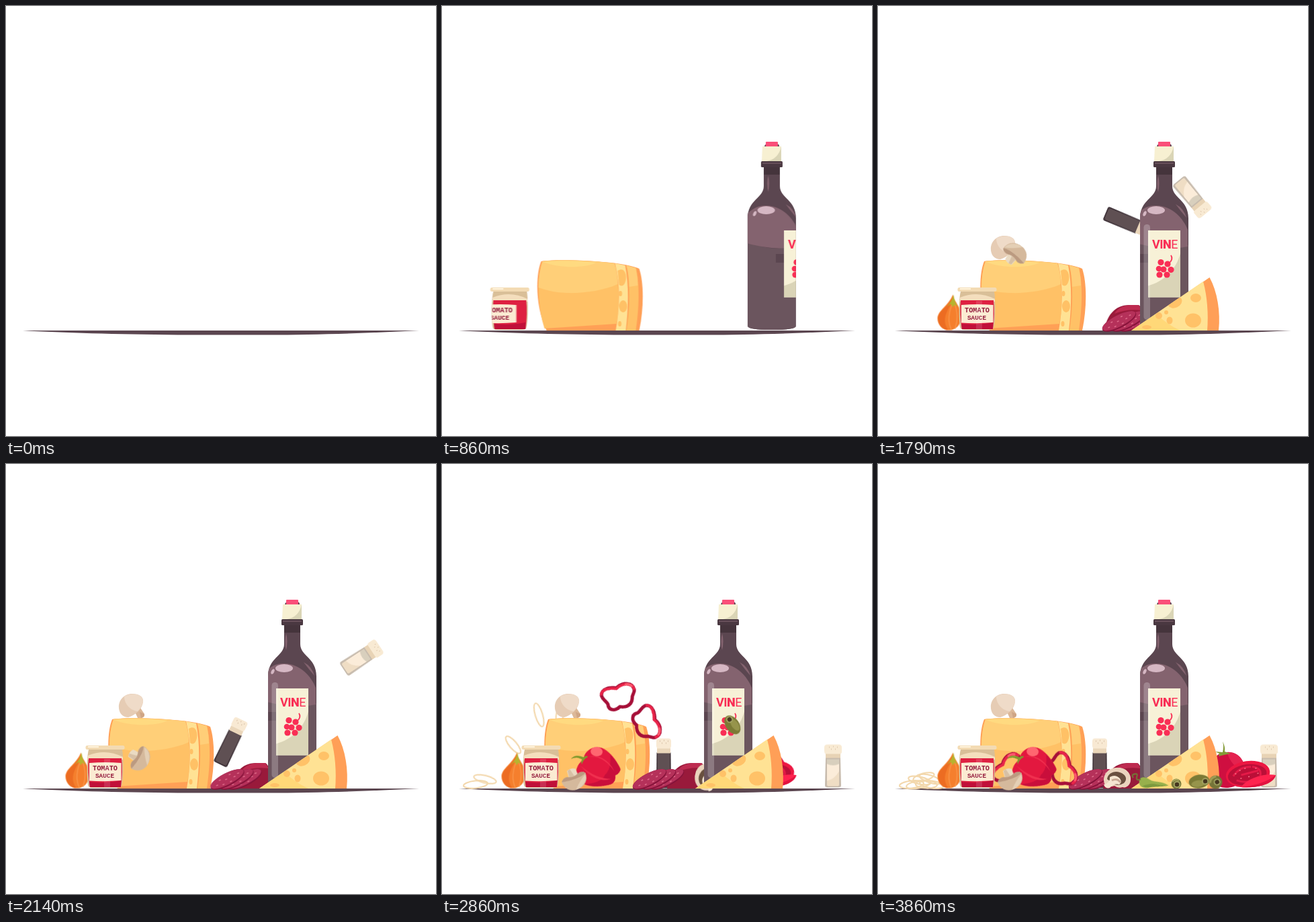
These frames come from a looping animation (640x640 px, 6000 ms). An HTML page:

```html
<!DOCTYPE html>
<html lang="en">
<head>
<meta charset="utf-8">
<title>Pizza ingredients</title>
<style>
:root { --t: 0ms }
html, body { margin: 0; width: 100%; height: 100%; overflow: hidden; background: #fff }
svg { display: block; width: 100vw; height: 100vh }
text { font-family: "Liberation Mono", monospace; font-weight: 700; text-anchor: middle }

/* Animations stay paused; the clock moves them by shifting their delay.
   Each part is hidden until its own start. */
.slide { animation: slide var(--d, 1298ms) var(--ease, cubic-bezier(.333,.667,.667,1)) both paused, show 1ms step-end both paused;
  animation-delay: calc(var(--s, 140ms) - var(--t)) }
.toss { animation: var(--path) 6s linear both paused, show 1ms step-end both paused;
  animation-delay: calc(0ms - var(--t)), calc(var(--s) - var(--t)) }
.ring { animation: ring 500ms linear both paused, show 1ms step-end both paused;
  animation-delay: calc(var(--s) - var(--t));
  fill: none; stroke: #f3d8ad; stroke-width: 2.2 }

@keyframes show { from { visibility: hidden } to { visibility: visible } }
@keyframes slide { from { transform: translateX(var(--from)) } to { transform: none } }
@keyframes ring {
  0% { transform: translate(185px,405px) rotate(0deg) }
  28% { transform: translate(164px,357px) rotate(-10deg) }
  57% { transform: translate(122px,392px) rotate(-24deg) }
  85% { transform: translate(88px,447px) rotate(-58deg) }
  100% { transform: translate(var(--x),var(--y)) rotate(var(--r)) }
}
@keyframes onion {
  0%, 17% { transform: translate(-30px,430px) rotate(-330deg) }
  18.6% { transform: translate(8px,355px) rotate(-255deg) }
  20.17% { transform: translate(36px,340px) rotate(-196deg) }
  22.6% { transform: translate(72px,366px) rotate(-100deg) }
  25.5%, 100% { transform: translate(106.5px,456.5px) }
}
@keyframes mushroom {
  0%, 14.8% { transform: translate(210px,425px) rotate(200deg) }
  17.5% { transform: translate(197px,315px) rotate(125deg) }
  20.17% { transform: translate(191px,276px) rotate(70deg) }
  22.6% { transform: translate(188px,296px) rotate(35deg) }
  26%, 100% { transform: translate(185px,359px) }
}
@keyframes half {
  0%, 18.6% { transform: translate(203px,475px) rotate(-10deg); opacity: 0 }
  20.17% { transform: translate(203px,454px); opacity: .8 }
  22% { opacity: 1 }
  25% { transform: translate(205px,362px) rotate(18deg) }
  29.83% { transform: translate(204px,369px) rotate(38deg) }
  34% { transform: translate(200px,415px) rotate(90deg) }
  38%, 100% { transform: translate(197px,470px) rotate(160deg); opacity: 1 }
}
@keyframes pepperpot {
  0%, 17% { transform: translate(426px,400px) rotate(180deg) }
  20.17% { transform: translate(455px,320px) rotate(212deg) }
  25% { transform: translate(424px,300px) rotate(165deg) }
  29.83% { transform: translate(372px,323px) rotate(112deg) }
  34% { transform: translate(338px,390px) rotate(45deg) }
  38%, 100% { transform: translate(330px,445.5px) }
}
@keyframes salt {
  0%, 24% { transform: translate(426px,400px) rotate(180deg) }
  29.83% { transform: translate(468px,283px) rotate(140deg) }
  34.5% { transform: translate(515px,262px) rotate(75deg) }
  38% { transform: translate(556px,338px) rotate(22deg) }
  41.67% { transform: translate(581px,438.5px) rotate(-8deg) }
  44%, 100% { transform: translate(582px,449.5px) }
}
@keyframes salami {
  0%, 25% { transform: translateX(112px) }
  29.83% { transform: translateX(49px); animation-timing-function: ease-out }
  41.67% { transform: translateX(7px) }
  47%, 100% { transform: none }
}
@keyframes slice {
  0%, 39% { transform: translate(440px,458px) rotate(-240deg) }
  41.67% { transform: translate(444px,466px) rotate(-200deg) }
  47% { transform: translate(398px,465px) rotate(-90deg) }
  51%, 100% { transform: translate(356px,467px) }
}
@keyframes pepper {
  0%, 36% { transform: translate(426px,400px) rotate(60deg) }
  39% { transform: translate(362px,352px) rotate(28deg) }
  41.67% { transform: translate(311px,377px) }
  44% { transform: translate(266px,420px) rotate(-30deg) }
  46.5%, 100% { transform: translate(232px,455px) rotate(-55deg) }
}
@keyframes loopA {
  0%, 38% { transform: translate(426px,390px) rotate(60deg) }
  41.67% { transform: translate(351px,342px) }
  47% { transform: translate(270px,340px) rotate(-15deg) }
  53.5% { transform: translate(202px,412px) rotate(-42deg) }
  57%, 100% { transform: translate(196px,456px) rotate(-50deg) }
}
@keyframes loopB {
  0%, 39% { transform: translate(426px,390px) rotate(120deg) }
  41.67% { transform: translate(399px,350px) rotate(90deg) }
  44.5% { transform: translate(350px,335px) rotate(75deg) }
  48% { transform: translate(298px,392px) rotate(65deg) }
  51%, 100% { transform: translate(273px,456px) rotate(60deg) }
}
@keyframes oliveA {
  0%, 39.5% { transform: translate(396px,470px) scale(0) }
  41.67% { transform: translate(400px,452px) rotate(8deg) }
  47% { transform: translate(428px,390px) rotate(50deg) }
  50.5% { transform: translate(452px,380px) rotate(80deg) }
  53.5% { transform: translate(471px,406px) rotate(105deg) }
  57%, 100% { transform: translate(478px,472.5px) rotate(172deg) }
}
@keyframes oliveB {
  0%, 49.5% { transform: translate(384px,425px) rotate(-90deg) scale(0) }
  53.5% { transform: translate(390px,367px) }
  56% { transform: translate(406px,362px) rotate(45deg) }
  59% { transform: translate(428px,412px) rotate(200deg) }
  62%, 100% { transform: translate(444px,476px) rotate(360deg) }
}
@keyframes oliveC {
  0%, 49.5% { transform: translate(458px,410px) rotate(-120deg) scale(0) }
  53.5% { transform: translate(480px,371px) }
  56% { transform: translate(490px,395px) rotate(100deg) }
  59.5%, 100% { transform: translate(502.5px,473.5px) rotate(330deg) }
}
@keyframes chili {
  0%, 49.5% { transform: translate(465px,410px) rotate(90deg) scale(0) }
  53.5% { transform: translate(516px,366px) rotate(18deg) }
  57% { transform: translate(480px,366px) rotate(5deg) }
  60.5% { transform: translate(438px,415px) rotate(-8deg) }
  63.8%, 100% { transform: translate(405px,471px) rotate(-14deg) }
}
</style>
</head>
<body>
<svg viewBox="0 0 640 640">
<defs>
  <clipPath id="jarClip"><path d="M123 425H173C175 437 175 470 172 479Q171 482 166 482H128Q123 482 122 478C120 465 120 437 123 425Z"/></clipPath>
  <clipPath id="bottleClip"><path id="glass" d="M414 239H438V268C438 286 462 288 462 316V476Q462 482 426 482Q390 482 390 476V316C390 288 414 286 414 268Z"/></clipPath>
  <clipPath id="wedgeClip"><path id="wedgeFace" d="M377 483L484 410C490 432 492 458 490 483Z"/></clipPath>
  <clipPath id="labelClip"><path d="M402 334H450V433.500H402Z"/></clipPath>
  <g id="loop" fill="none" stroke-linejoin="round">
    <path d="M-24 -11C-21 -20 -8 -18 0 -14C12 -20 25 -15 25 -4C24 2 19 2 18 8C14 18 3 18 -3 14C-12 19 -21 14 -19 6C-19 0 -26 -4 -24 -11Z" stroke="#a60f38" stroke-width="5"/>
    <path d="M-24 -12C-20 -19 -8 -17 0 -13C12 -19 25 -14 25 -5" stroke="#e92449" stroke-width="4" stroke-linecap="round"/>
    <path d="M15 -15Q20 -15 23 -10" stroke="#ff5c70" stroke-width="3" stroke-linecap="round"/>
  </g>
  <g id="hole"><circle r="5" fill="#a9ab68"/><circle r="3.300" fill="#46371f"/></g>
</defs>

<path d="M25 483H615C540 487 460 489.500 390 489.500H260C165 488.500 85 486.500 25 483Z" fill="#5b4650"/>

<g id="rings"></g>

<g class="toss" style="--path:mushroom;--s:880ms">
  <path d="M6 8L15 4L21 13Q22 18 16 19L11 19Z" fill="#dcb898"/>
  <path d="M14 10L21 13Q22 18 16 19Z" fill="#cfa585"/>
  <path d="M-13 14C-22 4 -16 -17 3 -17C14 -17 20 -12 19 -5C18 5 8 15 -3 18Q-9 18 -13 14Z" fill="#e6ccb4"/>
  <path d="M-9 -13C0 -19 20 -18 19 -5C18 0 15 5 11 9C0 8 -9 -2 -9 -13Z" fill="#efdbc8"/>
</g>

<g class="toss" style="--path:salt;--s:1440ms">
  <path d="M-11 -12H11L12 29Q12 32 8 32H-8Q-12 32 -12 29Z" fill="#c8bcae"/>
  <path d="M-9 -10H9V27Q9 30 6 30H-6Q-9 30 -9 27Z" fill="#fbecd9"/>
  <path d="M-9 -10H9V-3Q0 1 -9 -3Z" fill="#d8cfbd"/>
  <path d="M-9 22Q2 20 9 8V27Q9 30 6 30H-6Q-9 30 -9 27Z" fill="#efddc4"/>
  <path d="M-13 -28Q-13 -32 -8 -32H8Q13 -32 13 -28V-20Q12 -18 11 -18V-12H-11V-18Q-13 -19 -13 -22Z" fill="#f8ead3"/>
  <path d="M-11 -18H11V-12H-11Z" fill="#e8d3b5"/>
  <path d="M-6 -28h1M0 -29h1M6 -28h1M-3 -25h1M3 -25h1" stroke="#c9a98b"/>
</g>

<g class="slide" style="--s:2710ms;--d:685ms;--from:-56px">
  <path d="M514 430C530 425 546 437 546 455C546 473 534 482 518 482C504 482 497 471 497 456C497 442 502 431 514 430Z" fill="#cf0f40"/>
  <path d="M520 430C533 427 546 439 545 455C536 456 524 445 520 430Z" fill="#e4224f"/>
  <path d="M513 413Q517 421 516 428L525 431L515 433L507 435L508 431L502 428L513 429Q515 420 513 413Z" fill="#839a37"/>
</g>
<g class="slide" style="--s:2710ms;--d:685ms;--from:-96px">
  <g transform="translate(550.500 461.500) rotate(-8)">
    <ellipse rx="33" ry="19.500" fill="#ec1742"/><ellipse cx="-1" cy="1" rx="29" ry="15.500" fill="#bb0f38"/>
    <path d="M-22 0Q-10 -13 6 -10M-18 7Q-2 15 12 9M-10 0L16 -3M8 -10Q22 -6 18 5" fill="none" stroke="#e51a48" stroke-width="3"/>
    <path d="M-19 -3h2M-12 -7h2M-4 -9h2M-12 5h2M0 4h2M14 1h2M12 -7h2" stroke="#f8758b" stroke-width="1.500"/>
  </g>
</g>
<g class="slide" style="--s:2710ms;--d:650ms;--from:-108px">
  <path d="M540 481C551 467 575 460 592 463C589 475 567 483 540 481Z" fill="#ff234f"/>
  <path d="M540 481C560 479 580 473 592 463C589 476 567 483 540 481Z" fill="#e31340"/>
</g>

<g class="slide" style="--d:1010ms;--from:-312px;--ease:cubic-bezier(.215,.61,.355,1)">
  <path d="M158 380C175 377 225 378 262 382C280 384 295 387 304 391C311 412 311 450 304 483H166C150 450 149 402 158 380Z" fill="#ffa056"/>
  <path d="M160 380C185 377 235 379 267 383C275 415 275 450 270 473L163 480C153 450 151 405 160 380Z" fill="#ffc166"/>
  <path d="M160 380C185 377 235 379 267 383Q272 398 272 414C250 424 220 428 195 427Q172 426 154 419Q154 397 160 380Z" fill="#ffcf78"/>
  <path d="M161 381C185 378 215 379 240 382C225 390 185 391 161 381Z" fill="#ffda80"/>
  <path d="M268 383L283 386C289 415 288 450 284 483H269C275 450 276 415 268 383Z" fill="#ffe294"/>
  <path d="M285 386L299 390C305 415 304 450 299 483H285C290 450 291 415 285 386Z" fill="#ffc166"/>
  <path d="M285 386L299 390Q302 403 302 416L289 418Q289 401 285 386Z" fill="#ffce78"/>
  <g fill="#ffc166"><path d="M272 394C281 388 286 398 284 408C281 420 276 416 274 415Z"/><ellipse cx="280" cy="447" rx="6" ry="9"/><ellipse cx="276" cy="428" rx="2.500" ry="4"/><ellipse cx="275" cy="473" rx="2.500" ry="4"/></g>
</g>

<g class="toss" style="--path:onion;--s:1000ms">
  <path d="M5 -27C6 -17 17 -10 17 5C18 18 9 26 -1 26C-11 26 -18 18 -18 8C-17 -4 -2 -10 5 -27Z" fill="#f57f2d"/>
  <path d="M4 -22C-2 -8 -17 -3 -17 9C-17 20 -8 26 -2 26C-13 10 -3 -4 5 -18Z" fill="#ec6c22"/>
  <path d="M6 -18Q-6 8 3 26M7 -15Q15 5 8 24" fill="none" stroke="#fa9549" stroke-width="1.500"/>
  <path d="M6 -27Q7 -17 12 -9L7 -12L5 -8L2 -13L-4 -9Q4 -17 6 -27Z" fill="#b6b42f"/>
</g>

<g class="toss" style="--path:loopA;--s:2270ms"><use href="#loop"/></g>

<g class="slide" style="--from:-233px">
  <g clip-path="url(#jarClip)">
    <path d="M118 424H178V484H118Z" fill="#d9bf98"/>
    <path d="M122 434Q148 423 174 436V440H122Z" fill="#f4debd"/>
    <path d="M123 438H172Q174 458 171 481H125Q121 458 123 438Z" fill="#de2041"/>
    <path d="M124 473Q148 476 171 471V481H125Z" fill="#c01039"/>
    <g class="slide" style="--from:-72px">
      <path d="M124 445Q148 443 171.500 445V471Q148 473 124 471.500Z" fill="#fbebd2"/>
      <g fill="#931a3b"><text x="147.500" y="456" font-size="10.300">TOMATO</text><text x="147" y="466.500" font-size="9.400">SAUCE</text></g>
    </g>
    <rect class="slide" style="--from:-160px" x="146" y="439" width="9" height="42" fill="#fff" opacity=".13"/>
  </g>
  <rect x="118.500" y="419" width="58" height="6" rx="2.500" fill="#f3dbb4"/>
  <path d="M122 421H138" stroke="#fff5df" stroke-width="2"/>
</g>

<g class="toss" style="--path:pepperpot;--s:1020ms">
  <path d="M-10.500 -16H10.500L11 34Q11 37 8 37H-8Q-11 37 -11 34Z" fill="#43363c"/>
  <path d="M-9 -15H9V32Q9 35 6 35H-6Q-9 35 -9 32Z" fill="#5f5053"/>
  <path d="M-11 -33Q-11 -37 -7 -37H7Q11 -37 11 -33V-25L10 -23V-15H-10V-23L-11 -25Z" fill="#f8e9d3"/>
  <path d="M-10 -22H10V-15H-10Z" fill="#ead6ba"/>
  <path d="M-6 -33h1M0 -34h1M6 -33h1M-3 -30h1M3 -30h1" stroke="#b99a7f"/>
</g>

<g class="slide" style="--s:1430ms;--d:430ms;--from:60px">
  <path d="M335 483C338 462 350 445 372 445H386Q394 448 393 483Z" fill="#991a3b"/>
  <path d="M350 458Q357 446 374 445H386L391 453Q370 450 350 458Z" fill="#bd2b50"/>
</g>
<g class="toss" style="--path:salami;--s:1490ms">
  <g id="salami"></g>
</g>

<g class="toss" style="--path:loopB;--s:2330ms"><use href="#loop"/></g>
<g class="toss" style="--path:pepper;--s:2150ms">
  <path d="M0 -26C8 -32 25 -29 30 -14C33 0 26 18 20 27Q14 30 8 26Q0 33 -7 28C-17 20 -32 0 -30 -12C-27 -27 -10 -31 0 -26Z" fill="#e3183f"/>
  <path d="M-29 -4C-18 10 -8 15 0 13Q13 16 29 2Q26 18 20 27Q14 30 8 26Q0 33 -7 28C-17 20 -28 6 -29 -4Z" fill="#c90e3b"/>
  <path d="M-10 -25Q-13 5 0 24Q-19 10 -10 -25ZM6 -24Q23 -8 12 22Q27 -6 6 -24Z" fill="#f0304f"/>
  <ellipse cx="21" cy="-17" rx="7" ry="9" fill="#ff6670" transform="rotate(-30 21 -17)"/>
  <path d="M-10 -42Q0 -42 3 -28Q9 -26 7 -23Q0 -27 -7 -24Q-5 -28 -1 -28Q-2 -38 -10 -42Z" fill="#82992d"/>
</g>

<g class="toss" style="--path:half;--s:1110ms">
  <path d="M-8 2H7L6 16Q-1 19 -7 15Z" fill="#eadac2"/>
  <path d="M-2 5L1 17L5 16L6 4Z" fill="#d7c0a5"/>
  <path d="M-19 4C-19 -9 -10 -15 1 -15C12 -15 19 -7 19 3Q14 9 8 7Q0 3 -8 7Q-16 9 -19 4Z" fill="#d5b99c"/>
  <path d="M-19 4Q-7 -2 19 3Q14 9 8 7Q0 3 -8 7Q-16 9 -19 4Z" fill="#bb9a80"/>
  <path d="M-14 -8Q-7 -15 3 -15Q-7 -4 -18 2Q-18 -4 -14 -8Z" fill="#e4cfb5"/>
</g>

<g class="toss" style="--path:slice;--s:2350ms">
  <path d="M-20 4C-20 -9 -9 -16 2 -15C14 -15 21 -5 20 3C20 11 13 16 8 14Q1 16 -4 12Q-19 17 -20 4Z" fill="#ead4bd"/>
  <path d="M-15 2C-14 -7 -4 -11 4 -8C13 -5 16 2 10 8Q4 12 -4 10Z" fill="#69503f"/>
  <path d="M-11 -1Q-3 -6 4 1Q8 7 3 10Q-5 8 -11 15Q-18 17 -20 10Q-10 8 -11 -1Z" fill="#f5e6d1"/>
  <path d="M-8 4Q0 0 5 7" fill="none" stroke="#c7a994" stroke-width="3"/>
</g>

<g class="slide" style="--from:324px">
  <use href="#glass" fill="#5b4650"/>
  <path d="M414 239H438V251H414Z" fill="#45343c"/>
  <g clip-path="url(#bottleClip)">
    <path d="M390 350Q426 368 462 356V484H390Z" fill="#6b555e"/>
    <g class="slide" style="--from:18px">
      <path d="M374 360V322C388 304 400 296 414 297C438 297 455 317 461 333V358Q426 366 374 350Z" fill="#84636f"/>
      <ellipse cx="414" cy="304" rx="13" ry="6" fill="#d5b7c3"/>
      <ellipse cx="397" cy="309" rx="2.200" ry="4" fill="#d5b7c3" transform="rotate(25 397 309)"/>
      <path d="M443 295Q455 301 459 315Q451 306 443 295Z" fill="#84636f"/>
      <path d="M417 252Q420 264 417 277Q414 264 417 252Z" fill="#84636f"/>
    </g>
    <g class="slide" style="--from:210px">
      <path d="M390 369H402V382H390Z" fill="#5b4650"/>
      <g clip-path="url(#labelClip)">
        <path d="M402 334H450V434H402Z" fill="#f7f1d7"/>
        <path d="M452 358C448 389 428 410 400 417V436H452Z" fill="#dad4b7"/>
      </g>
      <text x="427" y="360.500" font-size="18" letter-spacing="-.5" fill="#f92e55" style="font-family:Roboto,sans-serif">VI<tspan font-weight="900">N</tspan><tspan font-weight="400">E</tspan></text>
      <path d="M436 371Q440 377 433 383" fill="none" stroke="#f92e55" stroke-width="1.800"/>
      <g fill="#f92e55"><circle cx="421" cy="381.500" r="4.600"/><circle cx="431" cy="384" r="4.600"/><circle cx="418" cy="391" r="4.300"/><circle cx="425" cy="392" r="4.600"/><circle cx="436" cy="392.500" r="4.600"/><circle cx="419" cy="400" r="4.600"/><circle cx="430" cy="400" r="4.600"/></g>
    </g>
    <rect class="slide" style="--from:486px" x="395.500" y="325" width="9.500" height="142" rx="4.500" fill="#fff" opacity=".22"/>
  </g>
  <path d="M415 209Q416 205 420 205H433Q437 205 437 209Z" fill="#5b4650"/>
  <rect x="417" y="202" width="18" height="7" rx="1" fill="#fa4f79"/>
  <path d="M412 209H440V231H411Z" fill="#f7f0d2"/>
  <path d="M440 209V231H418Q436 228 440 209Z" fill="#dad5b6"/>
  <rect x="410" y="231" width="32" height="9" rx="1.500" fill="#4a3841"/>
  <path d="M412 234H440" stroke="#68505b" stroke-width="2"/>
</g>

<g class="slide" style="--s:860ms;--d:574ms;--from:265px">
  <path d="M377 483L493.500 404C505 425 510 455 507 483Z" fill="#ff9f57"/>
  <use href="#wedgeFace" fill="#ffe294"/>
  <g clip-path="url(#wedgeClip)">
    <path d="M377 483L414 458Q430 474 450 483Z" fill="#ffd878"/>
    <g fill="#ffc268"><ellipse cx="473" cy="434.500" rx="8" ry="6.500"/><ellipse cx="469" cy="468" rx="12" ry="10.500"/><ellipse cx="442" cy="441" rx="11" ry="8" transform="rotate(-25 442 441)"/><circle cx="429" cy="456" r="3"/><ellipse cx="434" cy="468" rx="4.500" ry="5.500"/><circle cx="418" cy="461" r="5"/><ellipse cx="400" cy="478" rx="7" ry="3"/></g>
  </g>
</g>

<g class="toss" style="--path:chili;--s:2960ms">
  <path d="M-16 -3C-13 -10 -5 -8 0 -1C6 5 16 4 25 14C13 12 5 10 -4 10C-13 10 -19 4 -16 -3Z" fill="#97b04c"/>
  <path d="M-13 5Q2 4 8 8Q14 11 25 14C12 13 4 10 -4 10Q-10 9 -13 5Z" fill="#7d9a3e"/>
  <path d="M-13 -5Q-21 -4 -18 -10Q-14 -15 -21 -15Q-26 -14 -23 -10" fill="none" stroke="#6d8134" stroke-width="1.800"/>
</g>
<g class="toss" style="--path:oliveA;--s:2360ms">
  <ellipse rx="15.500" ry="10" fill="#7b7a35"/>
  <ellipse cx="2" cy="-3" rx="10" ry="5" fill="#96944b"/>
  <use href="#hole" x="-9" y="-1"/>
</g>
<g class="toss" style="--path:oliveB;--s:2960ms">
  <circle r="7.500" fill="#77783a"/><path d="M-6 -3Q-2 -8 4 -5" fill="none" stroke="#a5a45c" stroke-width="2"/><use href="#hole" x="1" y="1"/>
</g>
<g class="toss" style="--path:oliveC;--s:2960ms">
  <circle r="10" fill="#757438"/><path d="M-8 -3Q-3 -10 5 -7" fill="none" stroke="#9d9c54" stroke-width="3"/><use href="#hole" x="2" y="1"/>
</g>
</svg>
<script>
const LOOP = 6000, FPS = 14;

// Landing place and turn of each onion ring, in throwing order.
const landings = [[50, 477, -96], [62, 471, -78], [72, 477, -88], [60, 477, -100], [78, 469, -72], [68, 466, -105], [80, 477, -82]];
document.getElementById('rings').innerHTML = landings.map(([x, y, turn], i) =>
  `<ellipse class="ring" rx="5.5" ry="${18 - i % 3}" style="--s:${2220 + i * 143}ms;--x:${x}px;--y:${y}px;--r:${turn}deg"/>`).join('');

const spots = '<path d="M-19 1h3M-12 -4h3M-10 4h3M-3 -1h3M2 5h3M5 -5h3M10 1h3M17 -1h3" stroke="#df6d8b" stroke-width="1.5"/>';
document.getElementById('salami').innerHTML = [335, 323, 309].map(x =>
  `<g transform="translate(${x} 469.500) rotate(-27)"><ellipse rx="28" ry="9.500" fill="#86133a"/><ellipse cy="-1" rx="27.500" ry="8.500" fill="#b5315a"/>${spots}</g>`).join('');

function tick() {
  const frame = Math.floor(performance.now() % LOOP * FPS / 1000 + .07);
  document.documentElement.style.setProperty('--t', frame * 1000 / FPS + 'ms');
  requestAnimationFrame(tick);
}
tick();
</script>
</body>
</html>
```
